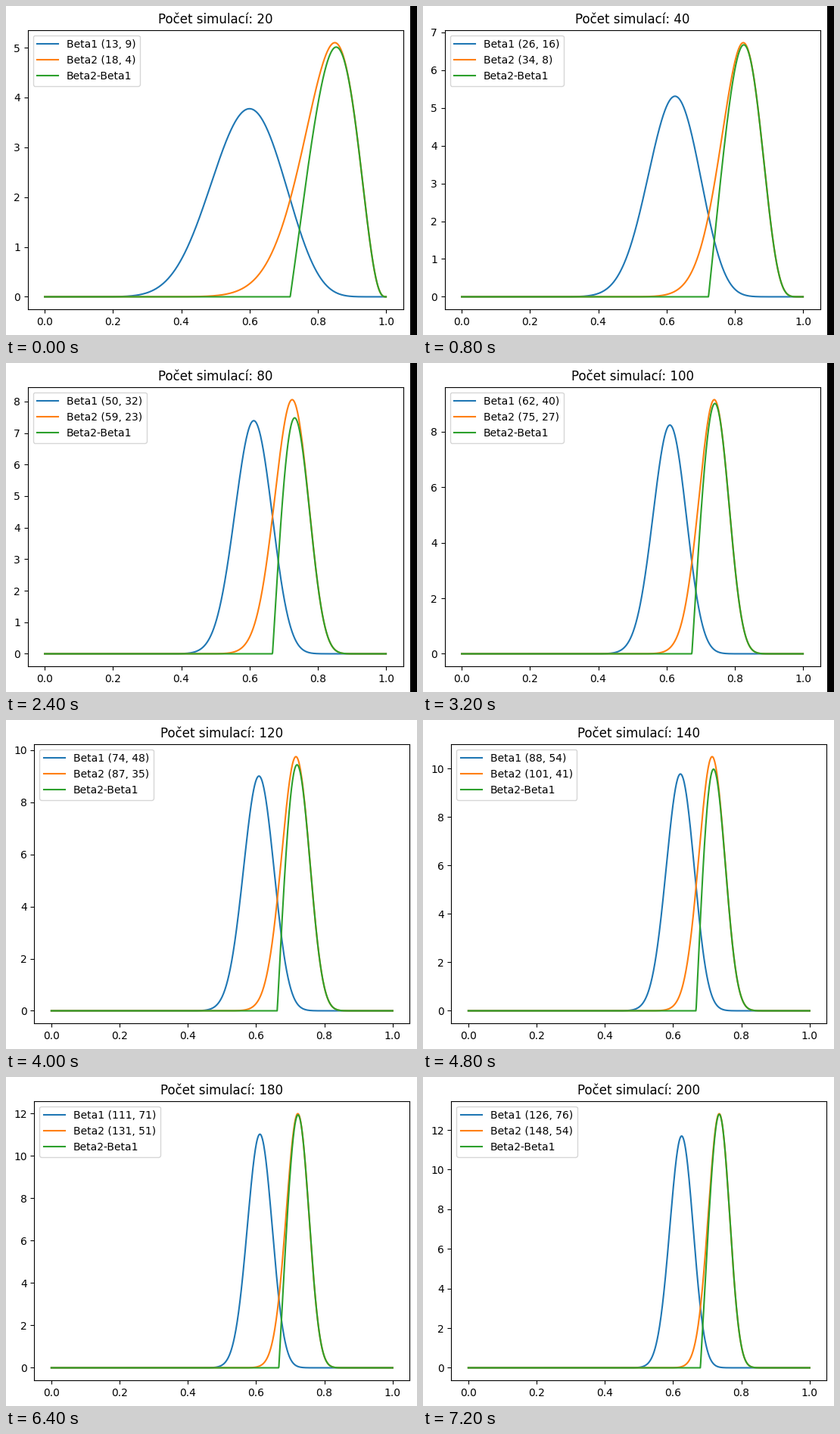
A matplotlib script that plays this animation: 543x435 px, repeating every 9.2 s.

```python
import math

import matplotlib.pyplot as plt
import numpy as np
from matplotlib.animation import FuncAnimation
from matplotlib.patches import Rectangle

W, H, DPI = 543, 435, 100
EPS = 1e-6  # keeps the pixel size from being rounded down
AX_W, AX_H = 496, 369.6
PAD = 10
TICK_MS = 400
TICKS_PER_STEP = 2
TICKS = 23  # the last step is held longer

# Successes of both variants after every 20 trials
WINS_1 = [12, 25, 37, 49, 61, 73, 87, 99, 110, 125]
WINS_2 = [17, 33, 44, 58, 74, 86, 100, 114, 130, 147]

x = np.linspace(0, 1, 1000)

fig = plt.figure(figsize=((W + EPS) / DPI, (H + EPS) / DPI), dpi=DPI,
                 facecolor="white")
ax = fig.add_axes([0.07, 0.08, AX_W / W, AX_H / H])
strip = fig.add_artist(Rectangle((1, 0), 0, 1, transform=fig.transFigure,
                                 facecolor="black", linewidth=0))
strip.set_in_layout(False)


def beta_pdf(a, b):
    scale = math.exp(math.lgamma(a + b) - math.lgamma(a) - math.lgamma(b))
    return scale * x ** (a - 1) * (1 - x) ** (b - 1)


def fit_layout():
    """Put the axes where their labels leave a fixed margin at left and bottom."""
    tight = fig.get_tightbbox()
    box = ax.get_position()
    left = PAD + box.x0 * W - tight.x0 * DPI
    bottom = PAD + box.y0 * H - tight.y0 * DPI
    ax.set_position([left / W, bottom / H, AX_W / W, AX_H / H])

    page = min(int(left + AX_W + PAD), W)
    strip.set_x(page / W)
    strip.set_width(1 - page / W)
    strip.set_visible(page < W)


def draw(tick):
    step = min(tick // TICKS_PER_STEP, len(WINS_1) - 1)
    trials = 20 * (step + 1)
    curves = []

    ax.clear()
    for k, wins in enumerate((WINS_1[step], WINS_2[step]), 1):
        a, b = wins + 1, trials - wins + 1
        curves.append(beta_pdf(a, b))
        ax.plot(x, curves[-1], label=f"Beta{k} ({a}, {b})")
    ax.plot(x, np.maximum(curves[1] - curves[0], 0), label="Beta2-Beta1")
    ax.set_title(f"Počet simulací: {trials}")
    ax.legend(loc="upper left")
    fit_layout()
    return []


anim = FuncAnimation(fig, draw, frames=TICKS, interval=TICK_MS,
                     init_func=lambda: draw(0), repeat=True, repeat_delay=0)
plt.show()
```
